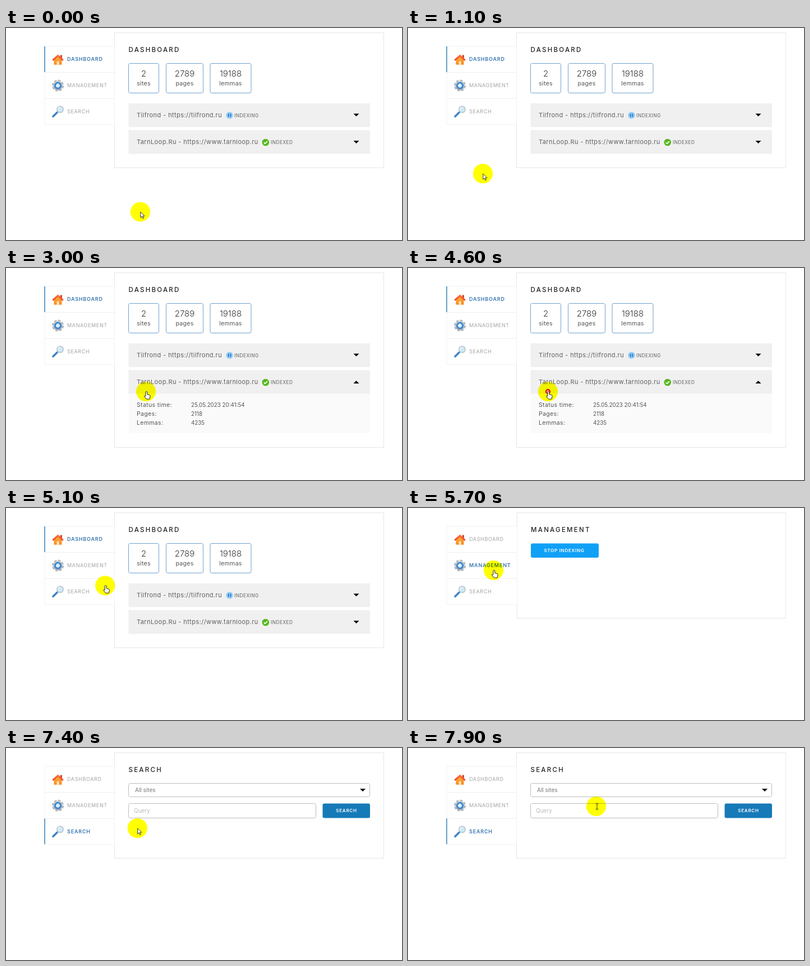
These frames come from a looping animation (706x380 px, 8000 ms). An HTML page:

```html
<!DOCTYPE html>
<html lang="en">
<head>
<meta charset="utf-8">
<title>Search engine dashboard</title>
<style>
html, body { margin: 0; width: 100%; height: 100%; overflow: hidden; background: #fff; }
svg { display: block; }
text { font-family: Inter, "Open Sans", sans-serif; fill: #555; white-space: pre; }
.title { font-size: 11.5px; font-weight: 500; letter-spacing: 2.25px; fill: #222; }
.item text { font-size: 9px; letter-spacing: .65px; fill: #a4a4a4; }
.item.on text { font-weight: 600; letter-spacing: .8px; fill: #3a78b0; }
.mid { text-anchor: middle; }
.num { font-size: 15px; font-weight: 300; fill: #333; }
.unit { font-size: 10.7px; letter-spacing: .2px; }
.site { font-size: 11px; letter-spacing: .42px; fill: #606060; }
.status { font-size: 8.3px; letter-spacing: .5px; fill: #606060; }
.label { font-size: 10.5px; letter-spacing: .35px; }
.value { font-size: 9.8px; }
.field { font-size: 10px; fill: #777; }
.btn { font-size: 8px; font-weight: 600; letter-spacing: .75px; fill: #fff; }
.line { fill: #fff; stroke: #e6e6e6; }
.box { fill: #fff; stroke: #6fa0cc; }
.input { fill: #fff; stroke: #bcbcbc; }
.row { fill: #f0f0f0; }
#spot { mix-blend-mode: multiply; }
</style>
</head>
<body>
<svg id="stage" width="706" height="380" viewBox="0 0 706 380">
  <defs>
    <linearGradient id="roof" x2="0" y2="1"><stop stop-color="#ff7a45"/><stop offset="1" stop-color="#e8431f"/></linearGradient>
    <linearGradient id="wall" x2="0" y2="1"><stop stop-color="#ffb040"/><stop offset="1" stop-color="#f58a1f"/></linearGradient>
    <linearGradient id="steel" x2="0" y2="1"><stop stop-color="#ccd0d4"/><stop offset="1" stop-color="#a2a9b0"/></linearGradient>
  </defs>

  <rect id="panel" class="line" y="8.5"/>
  <g id="menu"></g>
  <rect id="bar" x="68.2" width="1.6" height="46" fill="#3f89c0"/>

  <g class="page">
    <text class="title" x="218.5" y="43">DASHBOARD</text>
    <g id="stats"></g>
    <rect class="row" x="218.5" y="135" width="430.5" height="42.5"/>
    <text class="site" x="233" y="159.5">Tilfrond - https://tilfrond.ru</text>
    <circle cx="398.5" cy="156.5" r="6.2" fill="#9accf3"/>
    <path d="M396.7 153.5v6M400.4 153.5v6" stroke="#2a7fd0" stroke-width="2"/>
    <text class="status" x="407" y="159.5">INDEXING</text>
    <path d="M619.5 153.5h10l-5 5z"/>
    <rect class="row" x="218.5" y="183" width="430.5" height="42.5"/>
    <text class="site" x="233" y="207.5">TarnLoop.Ru - https://www.tarnloop.ru</text>
    <circle cx="462.8" cy="205" r="6.3" fill="#55b81c"/>
    <path d="M459.8 205l2.2 2.3 4-4.4" fill="none" stroke="#fff" stroke-width="1.7"/>
    <text class="status" x="472" y="207.5">INDEXED</text>
    <path id="toggle"/>
    <svg id="details" x="218.5" y="225.5" width="430.5">
      <rect width="431" height="71" fill="#fafafa"/>
      <text class="label" x="14.5" y="23">Status time:</text>
      <text class="value" x="111.5" y="23">25.05.2023 20:41:54</text>
      <text class="label" x="14.5" y="39">Pages:</text>
      <text class="value" x="111.5" y="39">2118</text>
      <text class="label" x="14.5" y="55.5">Lemmas:</text>
      <text class="value" x="111.5" y="55.5">4235</text>
    </svg>
  </g>

  <g class="page">
    <text class="title" x="219" y="43">MANAGEMENT</text>
    <rect x="219" y="63.5" width="121" height="25.5" rx="3" fill="#10a1f6"/>
    <text class="btn mid" x="278.5" y="79">STOP INDEXING</text>
  </g>

  <g class="page">
    <text class="title" x="218.5" y="43">SEARCH</text>
    <rect class="input" x="218.5" y="63.5" width="430" height="24" rx="3"/>
    <text class="field" x="230" y="79">All sites</text>
    <path d="M631 73h10l-5 5z"/>
    <rect class="input" x="218.5" y="99.5" width="334" height="26" rx="3"/>
    <text class="field" x="228" y="116" style="fill:#bbb">Query</text>
    <rect x="564.5" y="99.5" width="84.5" height="26" rx="3" fill="#167ab8"/>
    <text class="btn mid" x="607" y="115.3">SEARCH</text>
  </g>

  <circle id="spot" r="17.6" fill="#ff0"/>
  <g id="cursor">
    <circle id="click" r="3.6" fill="#ffb080" stroke="#e81010" stroke-width="2.2"/>
    <path id="arrow" d="M.3 .3V10.3l2.3-2.2 1.7 3.8 1.7-.7-1.7-3.7h3.2z" fill="#fff" stroke="#222" stroke-width=".9"/>
    <path id="hand" d="M-.6 .7Q1-1.3 2.4 .7V5l4 1.1q1.4.4 1.2 2.2L6.4 13.5H1L-3.2 8.3q.8-1.7 2.6 0z" fill="#fff" stroke="#222"/>
    <path id="beam" d="M-1-5.2q1.8 0 2.5.8q.7-.8 2.5-.8M1.5-4.4V4.8M-1 5.6q1.8 0 2.5-.8q.7.8 2.5.8" fill="none" stroke="#333"/>
  </g>
</svg>

<script>
const $ = id => document.getElementById(id);
const set = (el, attrs) => { for (const k in attrs) el.setAttribute(k, attrs[k]); };
const show = (el, on) => { el.style.display = on ? "" : "none"; };
const clamp = v => Math.max(0, Math.min(1, v));
const ease = v => .5 - .5 * Math.cos(Math.PI * clamp(v));

// Icons are drawn around the centre of a 22 px square.
const icons = {
  DASHBOARD: `<path d="M4-8h3.5v6H4z" fill="#c9502c"/>
    <path d="M-7-1L0-7 7-1V9.3H-7z" fill="url(#wall)"/>
    <path d="M-2 9.3V3h4.2v6.3z" fill="#fbe3b5"/>
    <path d="M0-9L10.3 .2 8.3 2.6 0-4.5-8.3 2.6-10.3 .2z" fill="url(#roof)"/>`,
  MANAGEMENT: `<circle r="8.6" fill="none" stroke="#b0b6bc" stroke-width="4" stroke-dasharray="4.5 2.25"/>
    <circle r="8.4" fill="url(#steel)"/>
    <circle r="5" fill="#d9f0ff" stroke="#3b86cc" stroke-width="2.8"/>`,
  SEARCH: `<path d="M-1.5 1.5L-8.5 8.5" stroke="#3f83c4" stroke-width="3.6" stroke-linecap="round"/>
    <path d="M-.5 .5l2-2" stroke="#a9b2ba" stroke-width="2.6"/>
    <circle cx="4" cy="-4" r="5.7" fill="#cdeaf7" stroke="#b3bfc8" stroke-width="1.5"/>
    <path d="M.5-4.5Q1-7.5 4-7.8" fill="none" stroke="#fff" stroke-width="1.3"/>`
};

$("menu").innerHTML = Object.entries(icons).map(([name, icon], i) => {
  const y = 33 + 46.7 * i;
  return `<g class="item"><rect x="69" y="${y}" width="124.5" height="46.7" fill="#fff" stroke="#f6efef"/>
    <g transform="translate(92.5 ${y + 23.5})">${icon}</g>
    <text x="109" y="${y + 26.4}">${name}</text></g>`;
}).join("");

$("stats").innerHTML = [[218.5, 54, 2, "sites"], [285.5, 66, 2789, "pages"], [364, 73, 19188, "lemmas"]]
  .map(([x, w, n, unit]) => `<rect class="box" x="${x}" y="63.5" width="${w}" height="53" rx="3"/>
    <text class="num mid" x="${x + w / 2}" y="87">${n}</text>
    <text class="unit mid" x="${x + w / 2}" y="102.5">${unit}</text>`).join("");

const pages = [...document.querySelectorAll(".page")];
const items = [...document.querySelectorAll(".item")];
const clicks = [1900, 4600, 5600, 7000];

// Pointer path: time, x, y
const path = [
  [0, 239.5, 329.5], [100, 182, 298], [200, 138, 262], [300, 200, 224], [400, 284, 224],
  [500, 248, 222], [800, 248, 222], [1000, 165, 277], [1100, 133.5, 261], [1300, 150, 248],
  [1700, 249.5, 221.5], [4700, 249.5, 221.5], [5300, 152.5, 111.5], [5800, 152.5, 111.5],
  [6400, 145, 147], [6800, 146.5, 169.5], [7000, 146.5, 169.5], [7800, 322, 118], [7900, 335.5, 104.5]
];

function pointer(t) {
  const i = path.findIndex(p => p[0] > t);
  if (i < 0) return path[path.length - 1].slice(1);
  const [t0, x0, y0] = path[i - 1], [t1, x1, y1] = path[i];
  const k = ease((t - t0) / (t1 - t0));
  return [x0 + (x1 - x0) * k, y0 + (y1 - y0) * k];
}

function draw(t) {
  const page = t < 5700 ? 0 : t < 7100 ? 1 : 2;
  const open = ease((t - 2100) / 400) - ease((t - 4700) / 400);
  pages.forEach((p, i) => show(p, i === page));
  items.forEach((item, i) => item.classList.toggle("on", i === page));

  const left = page === 1 ? 194.5 : 193.5;
  const bottom = page ? 197.5 : 250.5 + 71 * open;
  set($("panel"), { x: left, width: 673.5 - left, height: bottom - 8.5 });
  items.forEach(item => set(item.firstChild, { width: left - 69 }));
  set($("details"), { height: 71 * open });
  show($("details"), open > 0);
  set($("toggle"), { d: t >= 2200 && t < 4800 ? "M619.5 207h10l-5-5z" : "M619.5 202h10l-5 5z" });

  // The marker appears one step after the page switches.
  show($("bar"), !(t >= 5700 && t < 5800) && !(t >= 7100 && t < 7200));
  set($("bar"), { y: 33 + 46.7 * page });

  const [x, y] = pointer(t);
  const inside = (x0, y0, x1, y1) => x > x0 && x < x1 && y > y0 && y < y1;
  const hand = inside(69, 33, 193, 173) || page === 0 && inside(218, 135, 649, 225);
  const beam = page === 2 && inside(218, 99, 552, 126);
  set($("spot"), { cx: x, cy: y });
  set($("cursor"), { transform: `translate(${x} ${y})` });
  show($("hand"), hand);
  show($("beam"), beam);
  show($("arrow"), !hand && !beam);
  show($("click"), clicks.some(c => t >= c && t < c + 100));
}

const start = performance.now();
function tick() {
  draw(Math.floor((performance.now() - start) % 8000 / 100) * 100);
  requestAnimationFrame(tick);
}
tick();
</script>
</body>
</html>
```
